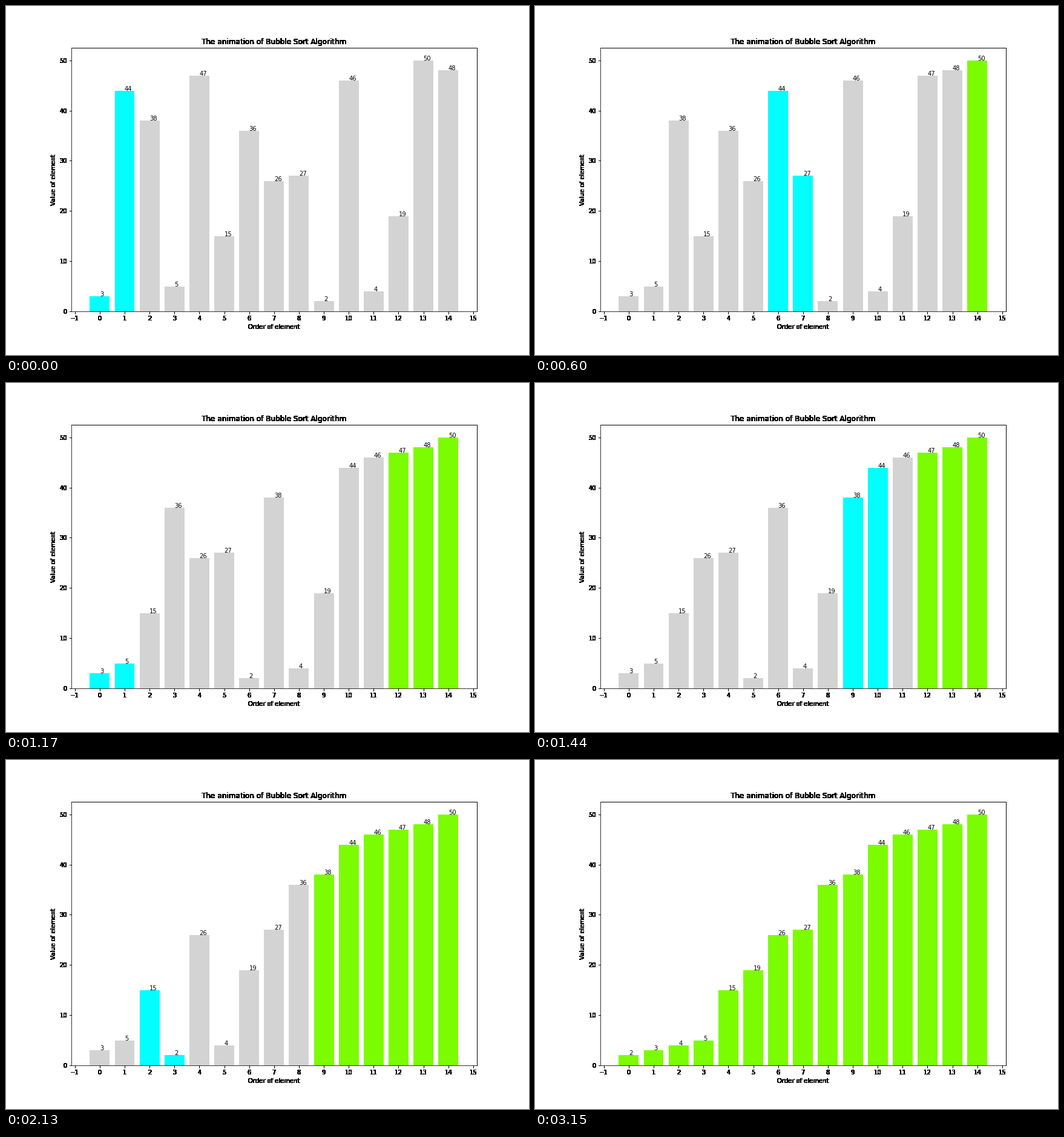
Recreate the animation shown at these times as a matplotlib script. Size 864 px wide and 576 px high, loop 3180 ms.

```python
import matplotlib.pyplot as plt
from matplotlib.animation import FuncAnimation

VALUES = [3, 44, 38, 5, 47, 15, 36, 26, 27, 2, 46, 4, 19, 50, 48]
IDLE, ACTIVE, DONE = "lightgray", "cyan", "lawngreen"

plt.rcParams.update({
    "font.family": "DejaVu Sans",
    "font.size": 10,
    "figure.subplot.left": 0.125,
    "figure.subplot.right": 0.9,
    "figure.subplot.bottom": 0.125,
    "figure.subplot.top": 0.88,
})


def bubble_steps(values):
    """Return (values, colors) before each comparison, then the sorted state."""
    a, n = list(values), len(values)
    steps = []
    for end in range(n - 1, 0, -1):
        for j in range(end):
            colors = [IDLE] * (end + 1) + [DONE] * (n - 1 - end)
            colors[j] = colors[j + 1] = ACTIVE
            steps.append((list(a), colors))
            if a[j] > a[j + 1]:
                a[j], a[j + 1] = a[j + 1], a[j]
    steps.append((list(a), [DONE] * n))
    return steps


def solid_black(img, dpi):
    """Turn every touched pixel fully black, without antialiasing."""
    img[..., :3] = 0
    img[..., 3] = img[..., 3] > 0
    return img, 0, 0


steps = bubble_steps(VALUES)

fig, ax = plt.subplots(figsize=(12, 8), dpi=72, facecolor="white")
bars = ax.bar(range(len(VALUES)), VALUES, width=0.8, color=IDLE)
labels = [ax.text(i, v, str(v)) for i, v in enumerate(VALUES)]

ax.set_xlim(-1.14, 15.14)
ax.set_ylim(0, 52.5)
ax.set_xticks(range(-1, 16))
ax.set_title("The animation of Bubble Sort Algorithm")
ax.set_xlabel("Order of element")
ax.set_ylabel("Value of element")

for part in (ax.title, ax.xaxis, ax.yaxis, ax.spines["top"], ax.spines["right"]):
    part.set_agg_filter(solid_black)


def update(k):
    values, colors = steps[k]
    for bar, label, v, c in zip(bars, labels, values, colors):
        bar.set_height(v)
        bar.set_color(c)
        bar.set_linewidth(0)
        label.set_y(v)
        label.set_text(str(v))
    return [*bars, *labels]


anim = FuncAnimation(fig, update, frames=len(steps), interval=30,
                     repeat=True, repeat_delay=0, blit=False)
plt.show()
```
